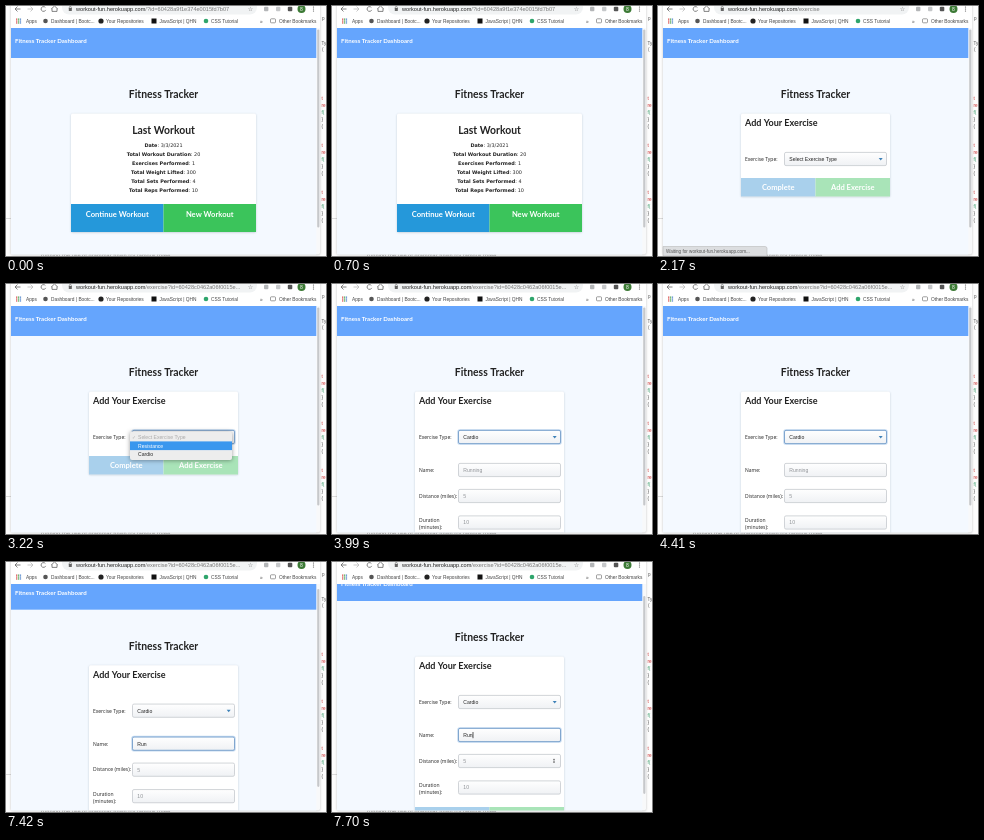
Write an HTML page with a canvas that moves like this. It is 320 px wide and 250 px high and loops after 8000 ms.

```html
<!DOCTYPE html>
<html lang="en">
<head>
<meta charset="utf-8">
<title>Fitness Tracker</title>
<style>
html, body { margin: 0; width: 100%; height: 100%; overflow: hidden; background: #fff; }
canvas { display: block; width: 320px; height: 250px; }
</style>
</head>
<body>
<canvas id="stage"></canvas>
<script>
const LOOP = 8000, STEP = 70;
const W = 320, H = 250;
const LATO = 'Lato, sans-serif';
const ARIAL = '"Liberation Sans", Arial, sans-serif';
const VERDANA = '"DejaVu Sans", Verdana, sans-serif';
const OPEN = '"Open Sans", sans-serif';
const BLUE = '#2598da', GREEN = '#3bc45b', GREEN_HOVER = '#32b74b';

const canvas = document.getElementById('stage');
const ctx = canvas.getContext('2d');
const dpr = window.devicePixelRatio || 1;
canvas.width = W * dpr;
canvas.height = H * dpr;

function rect(x, y, w, h, color) {
  ctx.fillStyle = color;
  ctx.fillRect(x, y, w, h);
}

function round(x, y, w, h, r, fill, stroke, line = 0.7) {
  ctx.beginPath();
  ctx.roundRect(x, y, w, h, r);
  if (fill) { ctx.fillStyle = fill; ctx.fill(); }
  if (stroke) { ctx.strokeStyle = stroke; ctx.lineWidth = line; ctx.stroke(); }
}

function dot(x, y, r, color) {
  ctx.beginPath();
  ctx.arc(x, y, r, 0, Math.PI * 2);
  ctx.fillStyle = color;
  ctx.fill();
}

function path(pts) {
  ctx.beginPath();
  for (let i = 0; i < pts.length; i += 2) ctx.lineTo(pts[i], pts[i + 1]);
}

function line(color, width, ...pts) {
  path(pts);
  ctx.strokeStyle = color;
  ctx.lineWidth = width;
  ctx.stroke();
}

// size < 0 in dy points the triangle up
function triangle(x, y, dx, dy, color) {
  path([x - dx, y, x + dx, y, x, y + dy]);
  ctx.fillStyle = color;
  ctx.fill();
}

// y is the middle of the capital letters; returns the right end
function text(str, x, y, size, font, color, weight = 400, align = 'left') {
  ctx.font = `${weight} ${size}px ${font}`;
  ctx.textAlign = align;
  ctx.fillStyle = color;
  ctx.fillText(str, x, y + size * 0.36);
  return x + ctx.measureText(str).width;
}

function shadowed(blur, color, draw) {
  ctx.save();
  ctx.shadowColor = color;
  ctx.shadowBlur = blur * dpr;
  ctx.shadowOffsetY = 0.5 * dpr;
  draw();
  ctx.restore();
}

function clipTo(x, y, w, h, draw) {
  ctx.save();
  ctx.beginPath();
  ctx.rect(x, y, w, h);
  ctx.clip();
  draw();
  ctx.restore();
}

function desktop() {
  rect(0, 0, W, H, '#fdfdfd');
  rect(0, 212, 5, 0.8, '#d4d4d4');
  const bits = [['t', '#c33'], ['re', '#c33'], ['f(', '#396'], ['}', '#444'], ['(', '#444']];
  for (const top of [92, 139, 186]) {
    bits.forEach(([s, c], i) => text(s, 315.5, top + i * 7, 4.6, ARIAL, c));
  }
  text('p', 316, 12, 4.6, ARIAL, '#555');
  text('Ty', 315.5, 37, 4.6, ARIAL, '#555');
  text('(', 316, 43, 4.6, ARIAL, '#555');
  text('running the use of grammar finish try famous three', 35, 248.7, 5, VERDANA, '#888');
}

function toolbar(url) {
  rect(5, 0, 309, 22, '#fff');
  round(56, -6, 195, 14.5, 7, '#f1f3f4');
  line('#666', 0.8, 14.5, 3, 9, 3);
  line('#666', 0.8, 11.5, 0.5, 9, 3, 11.5, 5.5);
  line('#bbb', 0.8, 21.5, 3, 27, 3);
  line('#bbb', 0.8, 24.5, 0.5, 27, 3, 24.5, 5.5);
  ctx.beginPath();
  ctx.arc(37.5, 3, 2.4, 0.4, 5.6);
  ctx.strokeStyle = '#666';
  ctx.stroke();
  line('#666', 0.8, 46, 2.5, 46, 5.4, 51, 5.4, 51, 2.5);
  line('#666', 0.8, 45.2, 3, 48.5, 0, 51.8, 3);
  rect(62.8, 2, 3, 3, '#666');
  round(63.3, 0.4, 2, 3, 1, null, '#666', 0.6);
  const x = text('workout-fun.herokuapp.com', 70, 3, 5.6, ARIAL, '#222');
  text(url, x, 3, 5.6, ARIAL, '#777');

  text('☆', 244.5, 3, 6, VERDANA, '#666', 400, 'center');
  round(258, 0.8, 4.4, 4.4, 1, '#b4b6b8');
  round(270, 0.8, 4.4, 4.4, 1, '#c6c8ca');
  round(281.8, 0.8, 4.5, 4.5, 1, '#555');
  dot(295.5, 3, 4, '#3c7a35');
  text('8', 295.5, 3, 5, ARIAL, '#fff', 400, 'center');
  for (let i = 0; i < 3; i++) dot(307.5, 1 + i * 2, 0.6, '#555');

  for (let i = 0; i < 9; i++) {
    rect(10 + i % 3 * 1.9, 12.5 + Math.floor(i / 3) * 1.9, 1.3, 1.3, ['#d55', '#5a5', '#58c'][i % 3]);
  }
  dot(39.5, 15, 2.3, '#555');
  dot(95, 15, 2.6, '#222');
  rect(145.5, 12.5, 5, 5, '#111');
  dot(200, 15, 2.3, '#2fa56c');
  round(264.5, 12.8, 5, 4, 0.8, null, '#777', 0.7);
  const marks = [['Apps', 20], ['Dashboard | Bootc...', 45], ['Your Repositories', 100],
    ['JavaScript | QHN', 153.5], ['CSS Tutorial', 205], ['»', 254], ['Other Bookmarks', 273]];
  for (const [s, at] of marks) text(s, at, 15, 4.8, ARIAL, '#444');
}

function card(x, y, w, h) {
  shadowed(2, 'rgba(60,80,100,.3)', () => round(x, y, w, h, 1.5, '#fff'));
}

function button(label, x, y, w, h, color, labelY) {
  rect(x, y, w, h, color);
  text(label, x + w / 2, labelY, 7.6, LATO, '#fff', 700, 'center');
}

function lastWorkout(hover) {
  card(65, 107.5, 185, 118.5);
  text('Last Workout', 157.5, 124, 10.4, LATO, '#222', 700, 'center');
  const rows = [['Date', '3/3/2021'], ['Total Workout Duration', 20], ['Exercises Performed', 1],
    ['Total Weight Lifted', 300], ['Total Sets Performed', 4], ['Total Reps Performed', 10]];
  rows.forEach(([name, value], i) => {
    const y = 139.2 + i * 8.95, size = 4.9, tail = `: ${value}`;
    ctx.font = `700 ${size}px ${VERDANA}`;
    const a = ctx.measureText(name).width;
    ctx.font = `400 ${size}px ${VERDANA}`;
    const x = 157.5 - (a + ctx.measureText(tail).width) / 2;
    text(name, x, y, size, VERDANA, '#222', 700);
    text(tail, x + a, y, size, VERDANA, '#222');
  });
  button('Continue Workout', 65, 198, 92.5, 28, BLUE, 208.3);
  button('New Workout', 157.5, 198, 92.5, 28, hover ? GREEN_HOVER : GREEN, 208.3);
}

function field(y, { focus, value = '', hint = '' }) {
  const g = ctx.createLinearGradient(0, y, 0, y + 14);
  g.addColorStop(0, '#fff');
  g.addColorStop(1, '#eff1f4');
  if (focus) round(126, y - 0.1, 103, 14.2, 1.8, null, '#c3d9f0', 1.4);
  round(126.5, y + 0.4, 102, 13.2, 1.5, g, focus ? '#6694c4' : '#c6cace', 0.8);
  return text(value || hint, 131.3, y + 7, 5.1, ARIAL, value ? '#222' : '#8f9296');
}

function label(str, y) {
  text(str, 87, y, 5, OPEN, '#222');
}

function popup(pick, alpha) {
  ctx.save();
  ctx.globalAlpha = alpha;
  shadowed(4, 'rgba(0,0,0,.4)', () => round(124, 147.5, 102, 28.5, 2, '#ededed'));
  text('✓', 126, 153.3, 4.6, VERDANA, '#aaa');
  text('Select Exercise Type', 132, 153.3, 5.1, ARIAL, '#aaa');
  ['Resistance', 'Cardio'].forEach((s, i) => {
    const y = 161.8 + i * 8.7, on = pick === i;
    if (on) rect(124, y - 4.4, 102, 8.7, '#3a97ee');
    text(s, 132, y, 5.1, ARIAL, on ? '#fff' : '#222');
  });
  ctx.restore();
}

function typed(t) {
  return t < 6370 ? '' : t < 6510 ? 'R' : t < 6650 ? 'Ru' : 'Run';
}

function caretOn(t) {
  if (t < 4830) return false;
  return !(t >= 5390 && t < 5880) && !(t >= 7140 && t < 7700);
}

function exercise(t) {
  const cardio = t >= 3990;
  const buttonY = cardio ? 258 : 172;
  card(83, 107.5, 149, buttonY + 18.5 - 107.5);
  text('Add Your Exercise', 87, 117, 9.05, LATO, '#222', 700);
  label('Exercise Type:', 153.6);
  field(146, { focus: t >= 3220 && t < 4830, value: cardio ? 'Cardio' : 'Select Exercise Type' });
  triangle(222.7, 152, 2, 2.5, '#3f82b8');

  if (cardio) {
    const name = typed(t);
    label('Name:', 186.2);
    const end = field(179, { focus: t >= 4830, value: name, hint: 'Running' });
    if (caretOn(t)) rect(name ? end : 131, 183, 0.7, 6.2, '#111');
    label('Distance (miles):', 211.8);
    field(205, { hint: '5' });
    if (t >= 7700) {
      triangle(222, 211.2, 1.2, -1.8, '#555');
      triangle(222, 212.4, 1.2, 1.8, '#555');
    }
    label('Duration', 236.3);
    label('(minutes):', 243.3);
    field(231.5, { hint: '10' });
  }

  button('Complete', 83, buttonY, 74.5, 18.5, '#a9d0ec', buttonY + 9.4);
  button('Add Exercise', 157.5, buttonY, 74.5, 18.5, '#a9e4b8', buttonY + 9.4);

  if (t >= 3220 && t < 3990) {
    const pick = t < 3500 ? 0 : t >= 3780 && t < 3850 ? -1 : 1;
    popup(pick, t < 3850 ? 1 : 0.6 - (t - 3850) / 350);
  }
}

function statusBar() {
  round(5, 240.5, 104, 9.5, [0, 2, 0, 0], '#dcdee0', '#bbb', 0.6);
  text('Waiting for workout-fun.herokuapp.com...', 8, 245.2, 4.6, ARIAL, '#555');
}

function urlAt(t) {
  if (t < 1820) return '/?id=60428a9f1e374e0015fd7b07';
  if (t < 2450) return '/exercise';
  return '/exercise?id=60428c0462a06f0015e...';
}

function draw(t) {
  const scroll = 13 * Math.min(1, Math.max(0, (t - 7350) / 210));
  ctx.setTransform(dpr, 0, 0, dpr, 0, 0);
  desktop();
  shadowed(2.5, 'rgba(0,0,0,.25)', () => round(5, -5, 309, 253.4, 2, '#f8f9fa'));
  clipTo(5, 22, 305.3, 226.4, () => {
    ctx.translate(0, -scroll);
    rect(5, 22, 306, 250, '#f4f9ff');
    rect(5, 22, 306, 30, '#65a5fd');
    text('Fitness Tracker Dashboard', 9, 35.2, 6.1, LATO, '#fff', 700);
    text('Fitness Tracker', 157.5, 88.5, 10.4, LATO, '#222', 700, 'center');
    if (t < 1820) lastWorkout(t >= 1050);
    else exercise(t);
  });
  round(311.2, 23.5 + scroll * 0.8, 2.2, 198, 1.1, '#c6c8cb');
  toolbar(urlAt(t));
  if (t >= 1610 && t < 2660) statusBar();
}

function frame(now) {
  const t = now % LOOP;
  draw(Math.floor(t / STEP + 1e-6) * STEP);
  requestAnimationFrame(frame);
}

draw(0);
requestAnimationFrame(frame);
</script>
</body>
</html>
```
